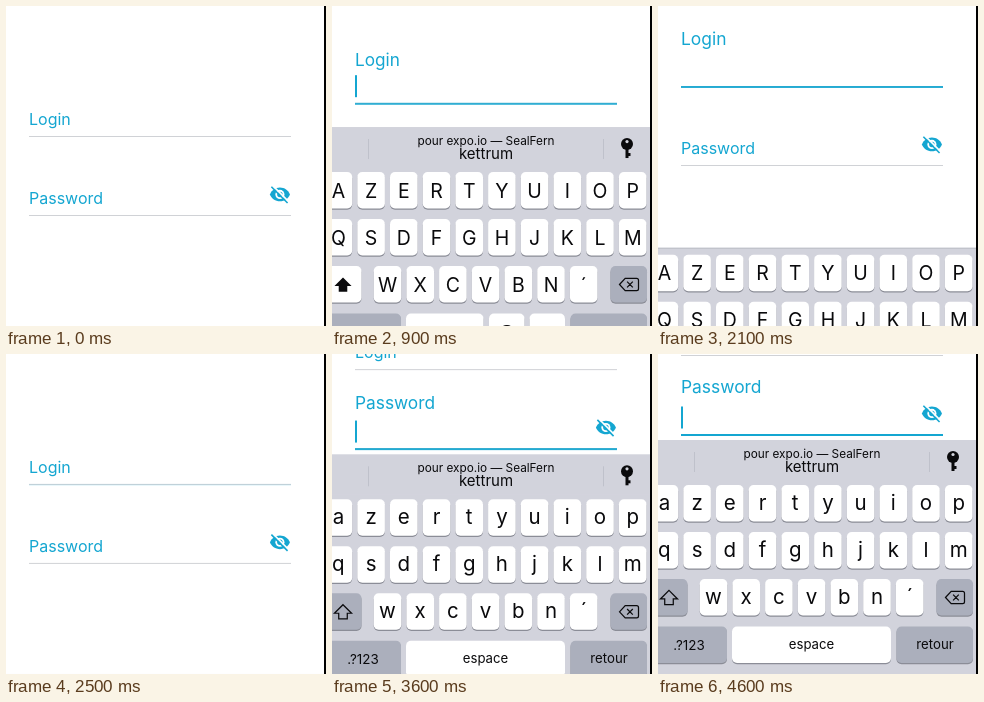
These frames come from a looping animation (320x320 px, 4.9 s). An HTML page with a canvas:

```html
<!DOCTYPE html>
<html lang="fr">
<head>
<meta charset="utf-8">
<title>Login form</title>
<style>
  html, body { margin: 0; width: 100%; height: 100%; overflow: hidden; background: #fff; }
  canvas { display: block; }
</style>
</head>
<body>
<canvas id="stage" width="320" height="320"></canvas>
<script>
const ctx = document.getElementById("stage").getContext("2d");
const LOOP = 4900, STEP = 100;
const TEAL = "#14a6d1", GREY_KEY = "#abafbc", PANEL = "#d2d3dc", INK = "#0a0a0c";
const PITCH = 32.7, KEY_W = 27.6, KEY_H = 36.5;
const LAYOUTS = {
  login: ["AZERTYUIOP", "QSDFGHJKLM", "WXCVBN´"],
  password: ["azertyuiop", "qsdfghjklm", "wxcvbn´"],
};
const EYE = new Path2D("M1 12C2.7 7.6 7 4.5 12 4.5S21.3 7.6 23 12C21.3 16.4 17 19.5 12 19.5S2.7 16.4 1 12Z");
const SHIFT = new Path2D("M0-8L9 1H4.500V7H-4.500V1H-9Z");
const ERASE = new Path2D("M-10 0L-4-6.500H8Q10-6.500 10-4.500V4.500Q10 6.500 8 6.500H-4ZM-2-3L4 3M4-3L-2 3");

const clamp = v => Math.max(0, Math.min(1, v));

// Critically damped spring from 0 to 1, u in ms since its start
function spring(u) {
  const x = Math.max(0, u) * 0.025;
  return 1 - (1 + x) * Math.exp(-x);
}

function blink(age) {
  return age < 900 ? clamp(1 - (age - 500) / 200) : clamp((age - 1000) / 200);
}

function text(str, x, y, size, color = INK, align = "center") {
  ctx.font = `${size}px Inter, sans-serif`;
  ctx.textAlign = align;
  ctx.fillStyle = color;
  ctx.fillText(str, x, y);
}

function rect(x, y, w, h, color, alpha = 1) {
  ctx.globalAlpha = alpha;
  ctx.fillStyle = color;
  ctx.fillRect(x, y, w, h);
  ctx.globalAlpha = 1;
}

function disc(x, y, r, color) {
  ctx.fillStyle = color;
  ctx.beginPath();
  ctx.arc(x, y, r, 0, 7);
  ctx.fill();
}

function line(x1, y1, x2, y2, width, color) {
  ctx.strokeStyle = color;
  ctx.lineWidth = width;
  ctx.beginPath();
  ctx.moveTo(x1, y1);
  ctx.lineTo(x2, y2);
  ctx.stroke();
}

function at(x, y, scale, draw) {
  ctx.save();
  ctx.translate(x, y);
  ctx.scale(scale, scale);
  draw();
  ctx.restore();
}

function field(name, y, float, active, cursor) {
  text(name, 23, y - 11 - 30 * float, 16 + 1.4 * float, TEAL, "left");
  rect(23, y, 262, 1, "#d0d2d6");
  rect(23, y, 262, 2, TEAL, active);
  rect(23, y - 28.5 + float, 2, 22, TEAL, cursor);
}

function hiddenEye(x, y) {
  at(x - 11, y - 11, 0.91, () => {
    ctx.fillStyle = TEAL;
    ctx.fill(EYE);
    disc(12, 12, 5, "#fff");
    disc(12, 12, 3, TEAL);
    line(3.5, 1.9, 22.1, 20.5, 2, "#fff");
    line(2.6, 3.6, 20.4, 21.4, 1.8, TEAL);
  });
}

function key(x, y, w, color = "#fff") {
  for (const [dy, fill] of [[1.2, "#8b8d97"], [0, color]]) {
    ctx.fillStyle = fill;
    ctx.beginPath();
    ctx.roundRect(x, y + dy, w, KEY_H, 5);
    ctx.fill();
  }
}

function suggestionBar() {
  rect(0, 86, 318, 40, PANEL);
  rect(36, 98, 1, 20, "#bfc1cb");
  rect(271, 98, 1, 20, "#bfc1cb");
  text("pour expo.io — SealFern", 154, 104, 11.8);
  text("kettrum", 154, 118, 15);
  disc(295, 103, 6, INK);
  disc(295, 100.5, 1.6, PANEL);
  rect(293.5, 108, 3, 9, INK);
  rect(296, 112, 2.5, 3, INK);
}

function keyboard(mode, offset, withBar) {
  const isLogin = mode === "login";
  at(0, offset, 1, () => {
    rect(0, 124, 318, 200, PANEL);
    if (withBar) suggestionBar();
    else rect(0, 124, 318, 1, "#bcbdc6");

    LAYOUTS[mode].forEach((row, r) => {
      const left = r === 2 ? 41.7 : -7.4, top = 131 + 47 * r;
      [...row].forEach((letter, i) => {
        const x = left + PITCH * i;
        key(x, top, KEY_W);
        text(letter, x + KEY_W / 2, top + (isLogin ? 25.5 : 24.5), isLogin ? 19.5 : 20.5);
      });
    });

    key(-10, 225, 39.5, isLogin ? "#fff" : GREY_KEY);
    key(278.5, 225, 36.5, GREY_KEY);
    ctx.strokeStyle = ctx.fillStyle = INK;
    ctx.lineWidth = 1.3;
    at(11, 244, 0.95, () => isLogin ? ctx.fill(SHIFT) : ctx.stroke(SHIFT));
    at(297, 243.5, 0.95, () => ctx.stroke(ERASE));

    key(-10, 272.5, 79, GREY_KEY);
    key(74, 272.5, isLogin ? 77.5 : 159);
    key(238.5, 272.5, 76.5, GREY_KEY);
    text(isLogin ? "123" : ".?123", 31, 296, 13.4);
    text("espace", isLogin ? 112.5 : 153.5, 295, 13.2);
    text("retour", 277, 295, 13.2);
    if (isLogin) {
      key(157, 272.5, 35.5);
      key(197.5, 272.5, 35.5);
      text("@", 174.7, 296, 17);
      text(".", 215.2, 295, 15);
    }
  });
}

function draw(t) {
  const loginFloat = spring(t - 765) - spring(t - 2160);
  const passwordFloat = spring(t - 3420);
  const scroll = 50 * (spring(t - 809) - spring(t - 2160)) + 129 * spring(t - 3449);
  const loginActive = spring(t - 765) * (1 - clamp((t - 2050) / 500));
  const loginCursor = t >= 700 && t < 2050 ? blink(t - 700) : 0;
  const passwordCursor = t >= 3400 ? blink(t - 3400) : 0;

  rect(0, 0, 320, 320, "#fff");
  field("Login", 130 - scroll, loginFloat, loginActive, loginCursor);
  field("Password", 209 - scroll, passwordFloat, passwordFloat, passwordCursor);
  hiddenEye(274, 188.5 - scroll);

  if (t > 3420) keyboard("password", 234 * (1 - passwordFloat), true);
  else if (t > 2019) keyboard("login", 196 * spring(t - 2019), false);
  else if (t > 765) keyboard("login", 234 * (1 - spring(t - 765)), true);

  rect(318, 0, 2, 320, "#000");
}

const start = performance.now();
function tick() {
  const t = (performance.now() - start) % LOOP;
  draw(Math.floor(t / STEP) * STEP); // the screen refreshes ten times a second
  requestAnimationFrame(tick);
}
tick();
</script>
</body>
</html>
```
